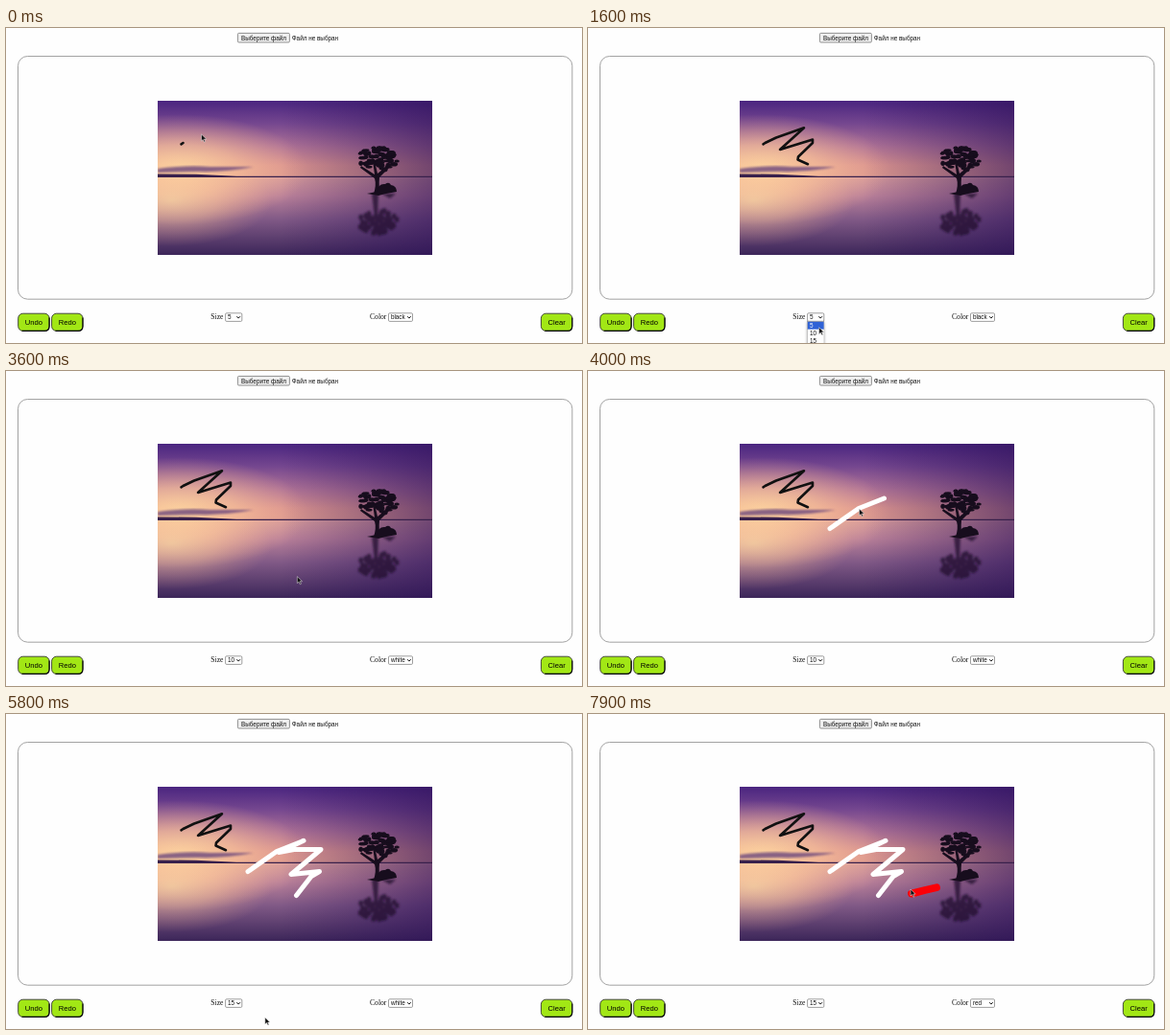
Recreate the animation shown at these times as an HTML page. Size 600 by 329 pixels, loop 8000 ms.

```html
<!DOCTYPE html>
<html lang="ru">
<head>
<meta charset="utf-8">
<title>Drawing board</title>
<style>
  html, body { margin: 0; width: 100%; height: 100%; overflow: hidden; background: #fefefe; }
  svg { display: block; width: 600px; height: 329px; }
  text { font: 6.35px "Liberation Sans", Arial, sans-serif; fill: #111; }
  .label { font: 7.62px "Liberation Serif", "Times New Roman", serif; }
  .btn text { font-size: 7.62px; text-anchor: middle; fill: #000; }
  .stroke { fill: none; stroke-linecap: round; stroke-linejoin: round; }
  .box { fill: #fff; stroke: #767676; stroke-width: .7; }
  .list { filter: drop-shadow(0 1px 1.5px #0005); }
</style>
</head>
<body>
<svg viewBox="0 0 600 329">
  <defs>
    <linearGradient id="sky" x2="0" y2="1">
      <stop offset="0" stop-color="#4a2580"/>
      <stop offset=".3" stop-color="#75478f"/>
      <stop offset=".6" stop-color="#ae7296"/>
      <stop offset=".85" stop-color="#d9938f"/>
      <stop offset="1" stop-color="#dc998f"/>
    </linearGradient>
    <linearGradient id="water" x2="0" y2="1">
      <stop offset="0" stop-color="#d59a9b"/>
      <stop offset=".25" stop-color="#b98099"/>
      <stop offset=".55" stop-color="#805986"/>
      <stop offset="1" stop-color="#3c2659"/>
    </linearGradient>
    <linearGradient id="dusk">
      <stop offset=".45" stop-color="#2d1058" stop-opacity="0"/>
      <stop offset="1" stop-color="#2d1058" stop-opacity=".6"/>
    </linearGradient>
    <radialGradient id="glow">
      <stop offset="0" stop-color="#ffdda2" stop-opacity=".95"/>
      <stop offset=".45" stop-color="#fdc79a" stop-opacity=".65"/>
      <stop offset="1" stop-color="#f5b094" stop-opacity="0"/>
    </radialGradient>
    <clipPath id="photo"><path d="M158 76h286v161h-286z"/></clipPath>
    <filter id="soft"><feGaussianBlur stdDeviation="1.3"/></filter>
  </defs>

  <rect x="241.4" y="5.4" width="54" height="9.6" rx="1.2" fill="#efefef" stroke="#767676" stroke-width=".8"/>
  <text x="245" y="12.5">Выберите файл</text>
  <text x="297.8" y="12.5">Файл не выбран</text>

  <rect x="12.5" y="29.5" width="577.3" height="253.7" rx="10" fill="none" stroke="#8b8b8b" stroke-width=".8"/>

  <g clip-path="url(#photo)">
    <path d="M158 76h286v79h-286z" fill="url(#sky)"/>
    <path d="M158 155h286v82h-286z" fill="url(#water)"/>
    <ellipse cx="180" cy="148" rx="135" ry="58" fill="url(#glow)"/>
    <ellipse cx="172" cy="180" rx="105" ry="48" fill="url(#glow)" opacity=".65"/>
    <path d="M158 76h286v161h-286z" fill="url(#dusk)"/>
    <path d="M158 147q30-4 54-2l46 0q-30 6-58 5l-42 1z" fill="#75507f" opacity=".85" filter="url(#soft)"/>
    <path d="M158 152.5l40 .2 42 2h204v1.3H158z" fill="#38204c"/>
    <g id="mirror" fill="#22112f" opacity=".75" filter="url(#soft)"></g>
    <g id="tree" fill="#170d1d"></g>
  </g>

  <g id="ink"></g>
  <g id="ui"></g>
  <text class="label" x="213.3" y="304.4">Size</text>
  <text class="label" x="379" y="304.4">Color</text>
  <path id="cursor" d="M0 0v7l1.7-1.5 1.2 2.6 1.2-.5-1.2-2.6h2.3z" fill="#111" stroke="#eee" stroke-width=".5"/>
</svg>
<script>
const $ = id => document.getElementById(id);

function add(parent, tag, attrs, text = '') {
  const el = document.createElementNS('http://www.w3.org/2000/svg', tag);
  for (const k in attrs) el.setAttribute(k, attrs[k]);
  el.textContent = text;
  parent.append(el);
  return el;
}

// Tree silhouette and its reflection
let seed = 7;
const rand = () => (seed = seed * 16807 % 2147483647) / 2147483647;
for (let i = 0; i < 65; i++) {
  const a = rand() * 6.283, r = Math.sqrt(rand());
  const x = 386 + Math.cos(a) * r * 22, y = 136 + Math.sin(a) * r * 12 + Math.abs(Math.cos(a)) * 3;
  add($('tree'), 'ellipse', { cx: x, cy: y, rx: 2 + rand() * 2.5, ry: 1.2 + rand() * 1.6 });
  add($('mirror'), 'ellipse', { cx: x, cy: 339 - y, rx: 2.4, ry: 3 });
}
add($('tree'), 'path', { d: 'M383 173q3-9 1-16l-15-11 1-2 14 9-2-14h2l3 13 14-11 1 2-13 13q-1 10 1 17z' });
add($('tree'), 'path', { d: 'M376 173l10-2q2-9 9-8 4-3 6 1 6 1 6 7l-11 2-8 2z' });
add($('mirror'), 'path', { d: 'M381 173h7l-1 24h-3zM391 173h15l-6 5z' });

function button(x, label) {
  const g = add($('ui'), 'g', { class: 'btn' });
  add(g, 'rect', { x, y: 298.2, width: 32.4, height: 18.2, rx: 5, fill: '#a2e715', stroke: '#333', 'stroke-width': .9 });
  add(g, 'path', { d: `M${x + 4} 316.4h23.4q5 0 5-5v-9`, fill: 'none', stroke: '#000', 'stroke-width': 1.1 });
  add(g, 'text', { x: x + 16.2, y: 309.7 }, label);
}
button(12.7, 'Undo');
button(47.6, 'Redo');
button(557.4, 'Clear');

// Select box; picks: [time, value index], opens: [start, hover change, close, hover before, after]
function select(x, width, options, picks, opens) {
  const ui = $('ui');
  add(ui, 'rect', { class: 'box', x, y: 297.8, width, height: 8.6, rx: 1.2 });
  const value = add(ui, 'text', { x: x + 2.4, y: 304.4 });
  add(ui, 'path', { d: `M${x + width - 5.4} 301.2l1.8 1.9 1.8-1.9`, fill: 'none', stroke: '#111', 'stroke-width': 1 });
  const list = add(ui, 'g', { class: 'list' });
  const back = add(list, 'rect', { x, y: 306.6, width, height: 26, 'stroke-width': .5 });
  const rows = options.map((name, i) => {
    const g = add(list, 'g', {}), y = 306.8 + i * 8;
    return [add(g, 'rect', { x: x + .2, y, width: width - .4, height: 8 }),
            add(g, 'text', { x: x + 2.4, y: y + 5.9 }, name), g];
  });
  return t => {
    value.textContent = options[picks.filter(p => p[0] <= t).pop()[1]];
    const open = opens.find(o => t >= o[0] && t < o[2]);
    list.style.display = open ? '' : 'none';
    if (!open) return;
    const fresh = t < open[0] + (open[5] || 100);
    const hover = t < open[1] ? open[3] : open[4];
    back.setAttribute('fill', fresh ? '#f3f3f3' : '#fff');
    back.setAttribute('stroke', fresh ? 'none' : '#888');
    rows.forEach(([bar, label, g], i) => {
      g.style.display = fresh ? 'none' : '';
      bar.style.fill = i === hover ? '#2f62d6' : '#fff';
      label.style.fill = i === hover ? '#fff' : '#111';
    });
  };
}

// Freehand line through timed points [time, x, y]
function stroke(color, width, points) {
  const el = add($('ink'), 'polyline', { class: 'stroke', stroke: color, 'stroke-width': width });
  return t => {
    const done = points.filter(p => p[0] <= t).map(p => [p[1], p[2]]);
    if (done.length) done.push(at(points, t));
    el.setAttribute('points', done.join(' '));
  };
}

function at(points, t) {
  const i = points.findIndex(p => p[0] > t);
  if (i < 0) return points[points.length - 1].slice(1);
  if (!i) return points[0].slice(1);
  const [a, b] = [points[i - 1], points[i]], k = (t - a[0]) / (b[0] - a[0]);
  return [a[1] + (b[1] - a[1]) * k, a[2] + (b[2] - a[2]) * k];
}

const parts = [
  stroke('#111', 2.6, [[-40, 182.5, 121.3], [0, 184.5, 120], [60, 196, 114.5], [200, 225, 104.3],
    [300, 200, 127], [480, 234, 116.5], [510, 234, 120], [580, 219, 134.5], [600, 218.5, 137.5], [700, 229, 142.2]]),
  stroke('#fff', 5, [[3800, 252, 164.5], [3900, 282, 143.5], [4000, 308.5, 133], [4020, 310, 132.3],
    [4100, 284, 144.5], [4200, 300, 141.5], [4300, 328, 141.5], [4400, 297, 167.5],
    [4500, 326.5, 164.5], [4540, 318, 169.5], [4600, 302.5, 189.5]]),
  stroke('#fb0007', 7.8, [[7700, 363, 181.3], [7800, 351, 184], [7900, 337, 187.6]]),
  select(228.6, 17.2, ['5', '10', '15'], [[0, 0], [2100, 1], [5700, 2]],
    [[1400, 1700, 2100, 0, 1], [5200, 5400, 5700, 1, 2]]),
  select(398.5, 25, ['black', 'white', 'red'], [[0, 0], [3400, 1], [7200, 2]],
    [[2800, 3100, 3400, 0, 1, 200], [6600, 6900, 7200, 1, 2]])
];

const path = [[0, 203.5, 111], [100, 224, 105], [200, 201, 127], [350, 234, 117], [450, 219, 136],
  [500, 229, 142], [600, 235, 191], [900, 240, 281], [1200, 242, 302], [1400, 242, 302],
  [1700, 240, 318], [1900, 239, 320], [2100, 239, 320], [2600, 412, 299], [2800, 413, 299.5],
  [3000, 413, 303], [3200, 409, 318], [3400, 406, 316], [3700, 252, 164], [3900, 310, 132],
  [4000, 282.5, 144], [4100, 300, 141], [4200, 328, 141], [4300, 297, 167], [4400, 327, 165],
  [4500, 303, 189], [4900, 243, 300], [5200, 243, 302], [5500, 239, 321], [5700, 239, 320],
  [6300, 424, 302], [6500, 418, 303], [6700, 417.5, 304], [7000, 411, 322], [7200, 410, 320],
  [7600, 363, 181], [7900, 336, 183]];

const start = performance.now();
function draw() {
  const t = Math.floor((performance.now() - start) % 8000 / 100) * 100;
  parts.forEach(part => part(t));
  $('cursor').setAttribute('transform', `translate(${at(path, t)})`);
  requestAnimationFrame(draw);
}
draw();
</script>
</body>
</html>
```
